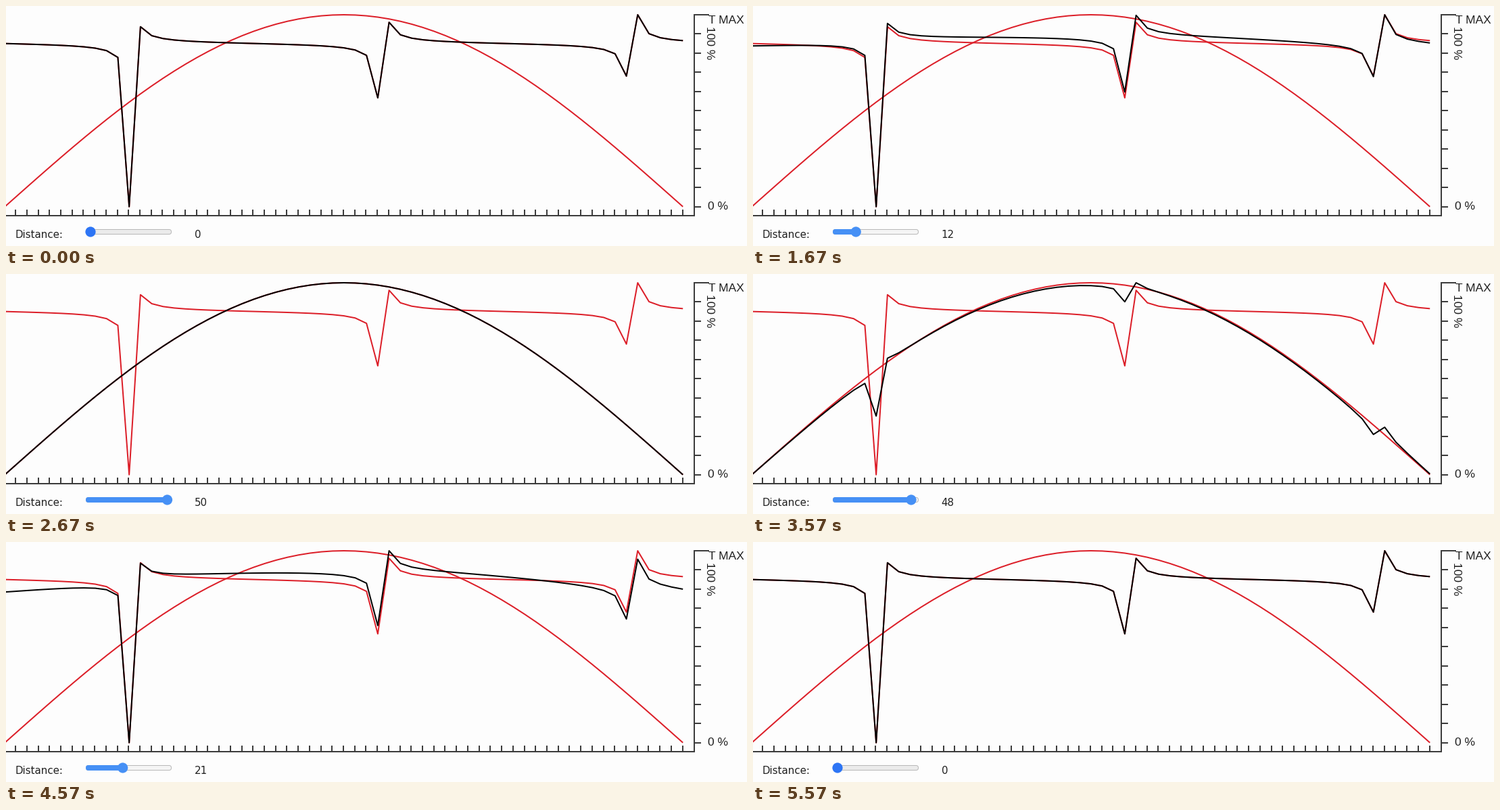
Recreate the animation shown at these times as a matplotlib script. Size 1096x356 px, loop 7070 ms.

```python
import numpy as np
import matplotlib.pyplot as plt
from matplotlib.animation import FuncAnimation
from matplotlib.patches import Circle, FancyBboxPatch

W, H, DPI = 1096, 356, 64
PX = 72 / DPI                      # points per pixel
STEP_MS, LOOP_MS = 35, 7070

PAPER, AXIS, INK, RED = "#fdfdfd", "#3c3c3c", "#202020", "#dc1e28"
TOP, BOTTOM = 13, 297.7            # 100 % and 0 %
D_MAX = 50

fig = plt.figure(figsize=(W / DPI, H / DPI), dpi=DPI, facecolor=PAPER)
ax = fig.add_axes([0, 0, 1, 1])
ax.set_xlim(0, W)
ax.set_ylim(H, 0)
ax.axis("off")


def line(x, y, color, width=2, **kw):
    return ax.plot(x, y, color=color, lw=width * PX,
                   solid_capstyle="butt", **kw)[0]


def label(x, y, text, size, font, color=INK, **kw):
    return ax.text(x, y, text, fontsize=size * PX, family=font, color=color,
                   va="baseline", **kw)


def bar(x, y, w, h, r, **kw):
    shape = FancyBboxPatch((x + r, y + r), w - 2 * r, h - 2 * r,
                           boxstyle=f"round,pad={r}", **kw)
    return ax.add_patch(shape)


# The two signals and their blend
i = np.arange(61)
xs = -1.7 + 16.715 * i
spikes = np.tan(3 * i)
arch = np.sin(np.pi * i / 60)


def to_y(v):
    return BOTTOM - (BOTTOM - TOP) * (v - v.min()) / (v.max() - v.min())


def blend(d):
    w = d / D_MAX
    return to_y((1 - w) * spikes + w * spikes.max() * arch)


# Axes
line([0, 1019], [311, 311], AXIS)
line([1018, 1018], [12, 312], AXIS)
for x in -2.6 + 16.72 * i[1:]:
    line([x, x], [302, 311], AXIS)
for k, y in enumerate(np.linspace(TOP, BOTTOM, 11)):
    line([1018, 1040 if k == 0 else 1028], [y, y], AXIS)

SANS = "Liberation Sans"
label(1038.8, 26, "T MAX", 17.4, SANS)
label(1038, 302, "0 %", 17.4, SANS)
label(1036.5, 30, "100 %", 17.4, SANS, rotation=-90, rotation_mode="anchor")

# Curves
line(xs, to_y(arch), RED)
line(xs, to_y(spikes), RED)
mix = line(xs, blend(0), "black")

# Slider
label(13.5, 344, "Distance:", 15, "DejaVu Sans")
number = label(278.5, 344, "0", 15, "DejaVu Sans")
track = bar(118.5, 331.5, 126, 7, 3.4, lw=PX, ec="#b8b8b8")
fill = bar(118, 331, 8, 8, 3.9, lw=0)
thumb = ax.add_patch(Circle((125, 335), 7.6, lw=0))

# Thumb and track colours per pointer state
IDLE = ("#2d75f5", "#ebebeb")
HOVER = ("#2a64d0", "#e6e6e6")
PRESSED = ("#4690f5", "#f5f5f5")

# Drag path: time in ms, distance
KEYS = [(1170, 0), (1400, 4), (1665, 12), (1970, 24), (2295, 37), (2670, 50),
        (3550, 50), (3590, 48), (4185, 33), (4570, 21), (5000, 2),
        (5190, 2), (5200, 1), (5320, 1), (5330, 0)]
TIMES, DISTS = zip(*KEYS)


def state(t):
    if 1000 <= t < 5530:
        return PRESSED
    if 500 <= t < 1000 or 5530 <= t < 5570:
        return HOVER
    return IDLE


def update(n):
    t = n * STEP_MS + 20
    d = int(round(np.interp(t, TIMES, DISTS)))
    blue, pale = state(t)
    x = 125 + 2.27 * d
    mix.set_ydata(blend(d))
    number.set_text(str(d))
    thumb.center = (x, 335)
    thumb.set_facecolor(blue)
    fill.set_width(x - 118 - 7.8)
    fill.set_facecolor(blue)
    fill.set_visible(d > 0)
    track.set_facecolor(pale)
    return mix, number, track, fill, thumb


anim = FuncAnimation(fig, update, frames=LOOP_MS // STEP_MS,
                     interval=STEP_MS, repeat=True, repeat_delay=0)
plt.show()
```
